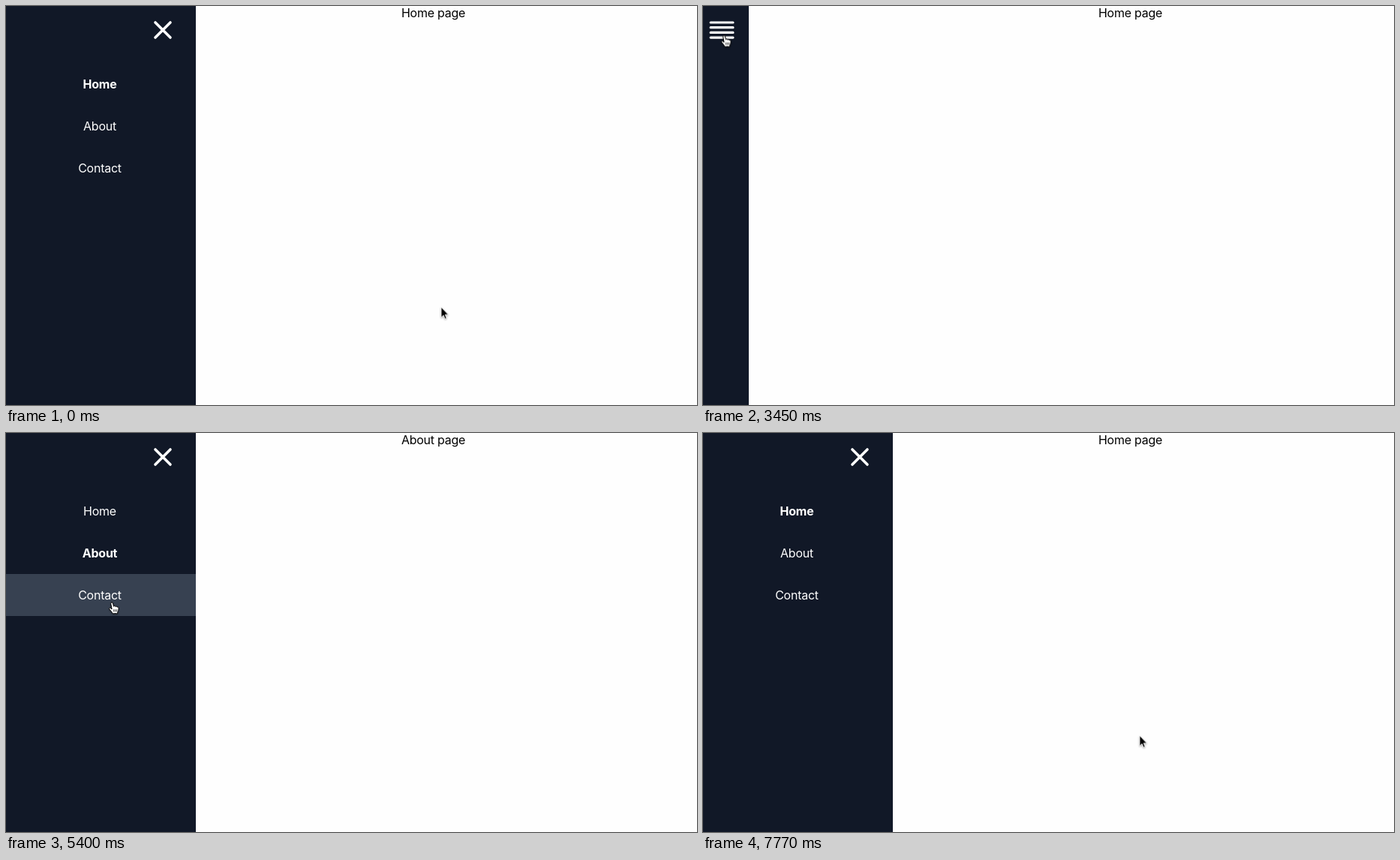
An HTML page for the animation above (8 s loop, 921 by 532 pixels).

```html
<!DOCTYPE html>
<html lang="en">
<head>
<meta charset="utf-8">
<title>Sliding sidebar</title>
<style>
  html, body { margin: 0; width: 100%; height: 100%; overflow: hidden; background: #fefefe; }
  body { position: relative; font: 16px/24px Inter, "Open Sans", sans-serif; letter-spacing: -.25px; }

  #page { position: absolute; left: 369.5px; top: -3.5px; width: 400px; text-align: center; color: #000; }

  #side {
    position: absolute; left: -3px; top: 0; width: 256px; height: 100%;
    background: #111827; color: #fff;
    animation: slide 8s linear infinite paused;
  }
  #side svg { position: absolute; left: 0; top: 0; fill: none; stroke: #fff; stroke-linecap: round; }
  nav { position: absolute; top: 76px; width: 100%; }
  nav div { height: 56px; line-height: 56px; text-align: center; }
  nav .hover { background: #374151; }
  nav .active { font-weight: 700; }
  .closed nav, .closed #cross, body:not(.closed) #bars { visibility: hidden; }

  #cursor {
    position: absolute; left: 0; top: 0; overflow: visible;
    filter: drop-shadow(0 1px .8px rgba(0, 0, 0, .35));
    animation: move 8s ease-in-out infinite paused;
  }
  .hand #arrow, body:not(.hand) #hand { visibility: hidden; }

  @keyframes slide {
    0% { transform: none; }
    31.25% { transform: none; animation-timing-function: cubic-bezier(.4, 0, .2, 1); }
    35% { transform: translateX(-192px); }
    44.175% { transform: translateX(-192px); animation-timing-function: cubic-bezier(.4, 0, .2, 1); }
    47.925%, 100% { transform: none; }
  }
  @keyframes move {
    0%, 3.75% { transform: translate(580px, 401.5px); }
    13.125%, 16.875% { transform: translate(514px, 327px); }
    28.125%, 33.75% { transform: translate(210.5px, 34.5px); }
    43.125%, 46.875% { transform: translate(28px, 38.5px); }
    56.25%, 60% { transform: translate(137px, 166.5px); }
    65.625% { transform: translate(141px, 240px); }
    67.5%, 71.25% { transform: translate(141px, 225px); }
    76.75% { transform: translate(174px, 133px); }
    80.5%, 89.875% { transform: translate(150px, 104px); }
    97.125%, 100% { transform: translate(582px, 403.5px); }
  }
</style>
</head>
<body>
<div id="page"></div>
<div id="side">
  <svg id="cross" width="256" height="60" stroke-width="3.6"><path d="M202 22l20 20m0-20l-20 20"/></svg>
  <svg id="bars" width="256" height="60" stroke-width="3.2"><path d="M205.2 22h29.8m-29.8 6.7h29.8m-29.8 6.7h29.8m-29.8 6.7h29.8"/></svg>
  <nav><div>Home</div><div>About</div><div>Contact</div></nav>
</div>
<svg id="cursor" width="20" height="20">
  <path id="arrow" d="M0 0V13.8L3.1 10.9 5.1 15.6 7.3 14.7 5.3 10.1H9.6Z" fill="#000" stroke="#fff" stroke-width=".9"/>
  <g id="hand" transform="translate(-4.5 0)" fill="#fff" stroke="#000" stroke-width="1" stroke-linejoin="round">
    <path d="M3.2 2.2C3.2.6 5.6.4 6 2L7 6.3C7.3 5.2 9 5.2 9.3 6.6 9.8 5.8 11.3 6 11.5 7.2 12.3 6.6 13.6 7 13.6 8.6 13.6 11 13.3 11.8 12.3 13.8L12.2 15.8H9.6L9.3 15 8.6 15.8H5.8C5 14 2.2 11 1.4 10 .4 8.7 1.8 7.7 3 8.6L4.6 10Z"/>
    <path d="M7.2 10.2v3.2m2-3.2v3.2m2-3.2v3.2" stroke-width=".8"/>
  </g>
</svg>
<script>
  const LOOP = 8000;
  const names = ['Home', 'About', 'Contact'];
  const links = [...document.querySelectorAll('nav div')];
  const page = document.getElementById('page');

  // [start in ms, value]
  const active = [[0, 0], [4650, 1], [5700, 2], [6740, 0]];
  const hover = [[0, -1], [4050, 0], [4350, 1], [5100, 2], [5990, 1], [6290, 0], [7480, -1]];
  const closed = [[0, false], [2550, true], [3600, false]];
  const hand = [[0, false], [2250, true], [2850, false], [3300, true], [3900, false], [4050, true], [7480, false]];
  const late = [5700, 5990, 6140, 6290, 6440, 6740, 7480, 7630, 7770];

  const at = (list, t) => list.filter(([start]) => start <= t).pop()[1];
  const sample = t => t < 5700 ? Math.floor(t / 150) * 150 : late.filter(s => s <= t).pop();

  const motions = document.getAnimations();
  const begin = performance.now();

  function draw() {
    const t = sample((performance.now() - begin) % LOOP);
    const current = at(active, t), over = at(hover, t);
    motions.forEach(m => { m.currentTime = t; });
    document.body.classList.toggle('closed', at(closed, t));
    document.body.classList.toggle('hand', at(hand, t));
    links.forEach((link, i) => {
      link.classList.toggle('active', i === current);
      link.classList.toggle('hover', i === over);
    });
    page.textContent = names[current] + ' page';
    requestAnimationFrame(draw);
  }
  draw();
</script>
</body>
</html>
```
